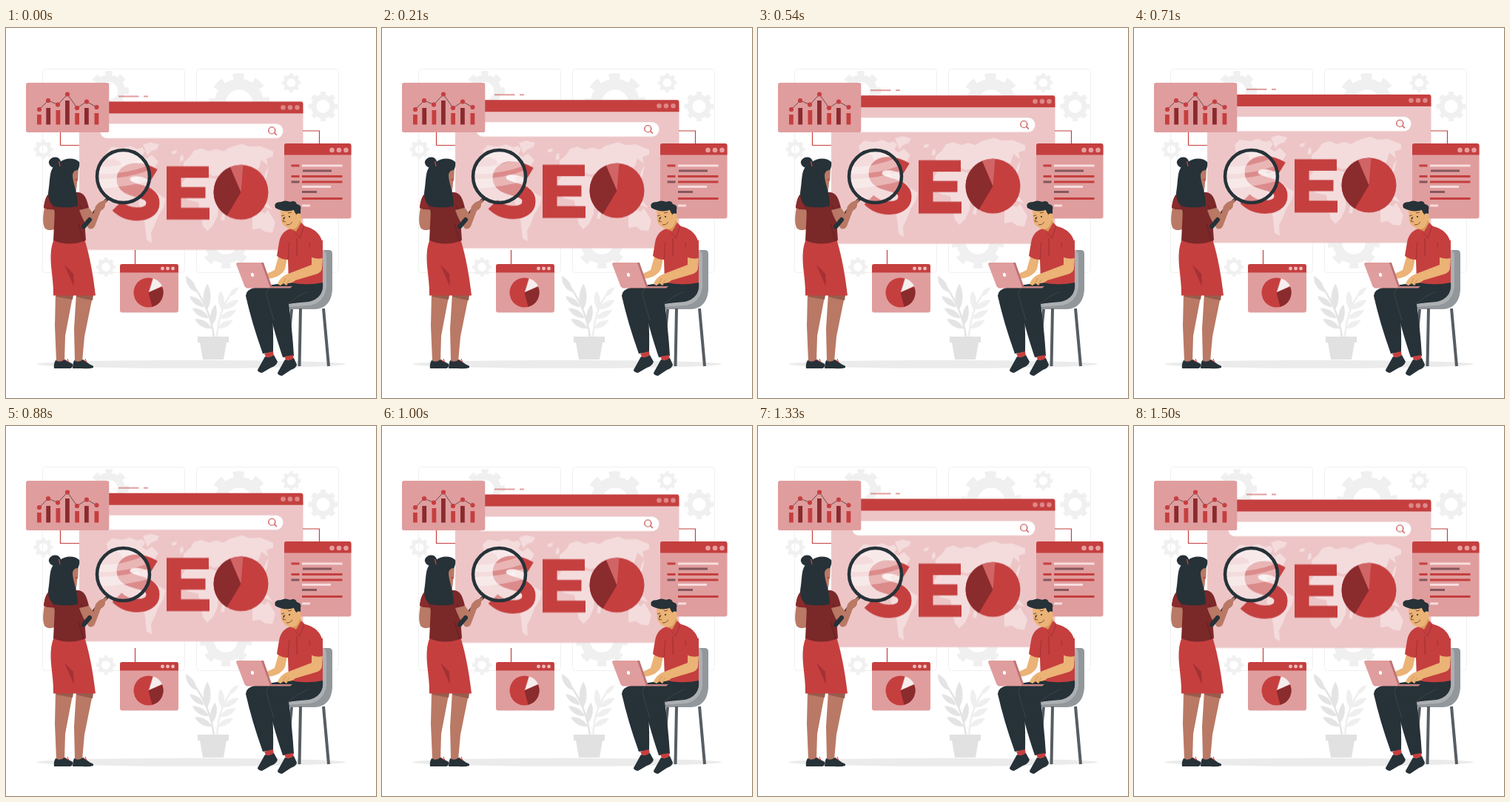
An HTML page that plays this animation: 500 by 500 pixels, repeating every 1540 ms.

```html
<!DOCTYPE html>
<html lang="en">
<head>
<meta charset="utf-8">
<title>SEO illustration</title>
<style>
  html, body { margin: 0; width: 100%; height: 100%; overflow: hidden; background: #fff; }
  svg { display: block; width: 100%; height: 100%; }
  .red { fill: #c53f3f; }
  .deep { fill: #8a2b2d; }
  .rose { fill: #e09d9e; }
  .ink { fill: #263238; }
  .wine { fill: #7b2829; }
  .tan { fill: #b97965; }
  .skin { fill: #ebb376; }
  .line { fill: none; stroke: #c53f3f; stroke-width: 1.2; }
  .pale { fill: none; stroke: #f0f0f0; }
  .float { animation: float 770ms cubic-bezier(.37, 0, .63, 1) -40ms infinite alternate; }
  @keyframes float {
    from { transform: translateY(.5px); }
    to { transform: translateY(-9.2px); }
  }
</style>
</head>
<body>
<svg viewBox="0 0 500 500" role="img" aria-label="SEO">
  <defs>
    <g id="gear" fill="none" stroke="#f0f0f0">
      <circle r="6.3" stroke-width="3.6"/>
      <circle r="8.9" stroke-width="2.2" pathLength="16" stroke-dasharray="1 1" stroke-dashoffset=".5"/>
    </g>
    <g id="dots">
      <circle r="3.3"/><circle cx="9.5" r="3.3"/><circle cx="19" r="3.3"/>
    </g>
    <path id="leaf" d="M0 0C-6 -8 -5 -19 0 -26C5 -19 6 -8 0 0Z"/>
    <clipPath id="glass"><circle cx="158.5" cy="200.5" r="35"/></clipPath>
  </defs>

  <!-- backdrop -->
  <rect class="pale" x="49.5" y="55.5" width="192" height="275" rx="4"/>
  <rect class="pale" x="257.5" y="55.5" width="192" height="275" rx="4"/>
  <use href="#gear" transform="translate(139 85) scale(2.7)"/>
  <use href="#gear" transform="translate(50.5 164) scale(1.3)"/>
  <use href="#gear" transform="translate(135 323) scale(1.3)"/>
  <use href="#gear" transform="translate(315 102) scale(4.1)"/>
  <use href="#gear" transform="translate(385.5 74) scale(1.3)"/>
  <use href="#gear" transform="translate(428.5 106) scale(2)"/>
  <use href="#gear" transform="translate(297 290) scale(3.5)"/>
  <ellipse cx="250" cy="454.3" rx="209" ry="5.5" fill="#ebebeb"/>

  <!-- plant -->
  <g fill="#efefef">
    <path d="M285 418Q287 382 305 358" fill="none" stroke="#efefef" stroke-width="2.5"/>
    <use href="#leaf" transform="translate(301 363) rotate(46) scale(.7)"/>
    <use href="#leaf" transform="translate(292 381) rotate(-5)"/>
    <use href="#leaf" transform="translate(293 380) rotate(60) scale(.95)"/>
    <use href="#leaf" transform="translate(289 393) rotate(62) scale(.95)"/>
    <use href="#leaf" transform="translate(286 406) rotate(62) scale(.9)"/>
  </g>
  <g fill="#e4e4e4">
    <path d="M281 418Q276 378 252 347" fill="none" stroke="#e4e4e4" stroke-width="2.5"/>
    <use href="#leaf" transform="translate(257 357) rotate(-33)"/>
    <use href="#leaf" transform="translate(268 377) rotate(-54) scale(.95)"/>
    <use href="#leaf" transform="translate(274 392) rotate(-59)"/>
    <use href="#leaf" transform="translate(278 406) rotate(-61)"/>
    <use href="#leaf" transform="translate(271 382) rotate(2) scale(1.2 1.4)"/>
    <use href="#leaf" transform="translate(278 402) rotate(10) scale(1 1.1)"/>
  </g>
  <path d="M259 417H301V425H298L294 448H266L262 425H259Z" fill="#e1e1e1"/>

  <!-- browser window -->
  <g class="float">
    <path class="line" d="M152 92H179.5M186 92H192"/>
    <path d="M99 110H401.500V299.500H99Z" fill="#edc5c6"/>
    <path class="red" d="M99 115V102Q99 99 102 99H398.500Q401.500 99 401.500 102V115Z"/>
    <use href="#dots" x="374.5" y="107" fill="#de8889"/>
    <rect x="127" y="129" width="247.5" height="19.5" rx="9.7" fill="#fff"/>
    <circle class="line" cx="359.3" cy="138" r="4.5"/>
    <path class="line" d="M362.5 141.2L366 144.2"/>

    <g fill="#f4dcdd">
      <path d="M136 167L143 160L157 162L168 159L177 163L184 161L188 166L184 172L190 176L197 171L206 180L201 188L194 190L188 199L179 204L181 211L188 215L184 217L173 211L166 201L160 193L154 180L145 176L138 178Z"/>
      <path d="M185 157L195 154L207 157L204 163L196 166L191 172L188 164Z"/>
      <path d="M187 217L199 217L207 225L216 230L213 242L206 253L201 266L196 276L197 290L190 286L188 267L185 249L179 237L182 223Z"/>
      <path d="M240 181L249 173L254 165L264 162L274 166L284 163L294 166L302 161L319 156L329 160L343 159L361 166L361 173L352 176L354 185L345 178L342 188L337 196L340 206L334 211L330 220L324 214L319 207L315 219L310 217L304 205L296 205L290 198L281 200L272 196L263 196L255 193L246 199L240 193Z"/>
      <path d="M244 200L263 199L283 203L291 216L299 219L293 230L287 238L286 253L280 266L272 274L266 267L262 248L260 235L246 232L237 222L238 209Z"/>
      <path d="M293 247L297 245L295 260L290 259Z"/>
      <path d="M333 255L343 247L350 250L354 245L364 262L360 276L350 275L343 270L333 272Z"/>
      <path d="M322 224L332 233L340 235L332 237L323 230ZM341 231L354 237L360 245L349 241ZM351 193L355 187L352 202L347 206Z"/>
      <path d="M235 174L239 170L240 178L235 181ZM224 166L231 164L230 169L224 170Z"/>
    </g>

    <path d="M200 198.500C192 193.500 183 191 176 191C164 191 158.500 197 158.500 204C158.500 214 168 216.500 178 219.500C190 222.500 198.500 226 198.500 236C198.500 246 189 251 177 251C167 251 157 247 150 240" fill="none" stroke="#c53f3f" stroke-width="18"/>
    <path class="red" d="M217 186.500H274V202H236.500V214.500H269.500V229.500H236.500V242.500H275V258.500H217Z"/>
    <circle class="red" cx="317.5" cy="221.5" r="37"/>
    <path class="deep" d="M317.500 221.500L298.500 253.200A37 37 0 0 1 303 187.500Z"/>
    <path d="M317.500 221.500L303 187.500A37 37 0 0 1 320.500 184.600Z" fill="#d16465"/>
  </g>

  <!-- connectors -->
  <path class="line" d="M73.500 141V158.500H99M401 139H423.500V156M174.500 300V319"/>

  <!-- bar chart card -->
  <rect class="rose" x="27" y="74" width="112.3" height="67" rx="2.5"/>
  <path class="red" d="M42 117h5.800v13.500h-5.800zM67.500 111h5.800v19.500h-5.800zM93.200 115h5.800v15.500h-5.800zM119.500 115h5.800v15.500h-5.800z"/>
  <path class="deep" d="M54.300 108h5.800v22.500h-5.800zM80 98h5.800v32.500h-5.800zM106 108h5.800v22.500h-5.800z"/>
  <path d="M45 110L57 98L70 103.500L83 89.500L96 108L109 99.500L122.500 107" fill="none" stroke="#4b3638" stroke-width=".8"/>
  <path d="M45 110h0M57 98h0M70 103.500h0M83 89.500h0M96 108h0M109 99.500h0M122.500 107h0" stroke="#c53f3f" stroke-width="6.2" stroke-linecap="round"/>

  <!-- pie card -->
  <rect class="rose" x="154" y="319" width="79" height="65.5" rx="3"/>
  <path class="red" d="M154 330.500V322Q154 319 157 319H230Q233 319 233 322V330.500Z"/>
  <use href="#dots" transform="translate(211.5 325) scale(.74)" fill="#eebcbc"/>
  <circle class="red" cx="192.5" cy="357.5" r="20"/>
  <path class="rose" d="M192.500 357.500L198.500 338A20 20 0 0 1 211 349.500Z"/>
  <path d="M193.500 356.500L199 338.500A20 20 0 0 1 211 348.500Z" fill="#f6eeee"/>
  <path class="deep" d="M192.500 357.500L211 349.500A20 20 0 0 1 197.500 376.800Z"/>

  <!-- list card -->
  <rect class="rose" x="376" y="156" width="90.5" height="101.5" rx="3"/>
  <path class="red" d="M376 171.500V159Q376 156 379 156H463.500Q466.500 156 466.500 159V171.500Z"/>
  <use href="#dots" x="440.5" y="165" fill="#e79fa0"/>
  <g fill="none" stroke-width="3.2">
    <path d="M385.500 186H396.500M385.500 200.500H396.500M400 200.500H454.500M400 208H454.500M400 230.500H454.500" stroke="#c53f3f"/>
    <path d="M401 193H440M385.500 208H396.500M400 221.500H420" stroke="#85565c"/>
    <path d="M400 186H454.500M400 214.500H439M400 240H411" stroke="#f8dcdd"/>
  </g>

  <!-- woman -->
  <path class="tan" d="M67 358H91L80 416L79 451H68L66 402Z"/>
  <path class="tan" d="M95 358H118L106 417L103 451H93L92 406Z"/>
  <path d="M69 361H91L90 367Q78 365 68 363ZM95 361H118L117 368Q105 366 95 363Z" fill="#965c4c"/>
  <path class="ink" d="M67 449Q73 453 79 448L90 454Q91 459 87 460H65Q64 454 67 449ZM92 449Q98 453 104 448L114 455Q119 456 118 459Q113 461 103 460H90Q90 454 92 449Z"/>
  <path d="M79 448l5 3m-1-4l2 5M104 448l4 3m-1-4l2 5" stroke="#c53f3f" stroke-width="1" fill="none"/>
  <path class="red" d="M65 285H106C114 311 118 336 121 361.500H64C65 334 55 309 65 285Z"/>
  <path d="M79 320L92 350L91 332Z" fill="#a63034"/>
  <path class="tan" d="M52 242L67 243L66 272Q56 275 52 270C49 262 50 254 52 242Z"/>
  <path class="wine" d="M60 222C54 226 52 234 51 243Q57 246 66 245L64 287Q85 296 108 287L105 248L112 243C109 230 106 223 98 222Z"/>
  <path d="M60 222C54 226 52 234 51 243Q57 246 65 245L62 228Z" fill="#8a2b2d"/>
  <path d="M105 288L98 265M67 250L63 240M106 248L100 240" stroke="#611e21" stroke-width=".8" fill="none"/>
  <path class="tan" d="M84 204L96 207Q96 222 91 228L82 226Z"/>
  <path class="tan" d="M86 190L98 188L97.500 199Q98 210 92 211L84 209Z"/>
  <path class="ink" d="M73 181C79 176 92 174 99 181Q100 187 97 192Q91 192 90 198C90 211 97 220 97 241Q80 244 65 241Q57 236 57 223C60 206 58 192 66 186Z"/>
  <path class="ink" d="M58 183Q57 178 63 175Q71 173 74 180Q75 188 67 189Q60 189 58 183Z"/>
  <path d="M71.500 180L73 187" stroke="#c53f3f" stroke-width="1.4"/>
  <circle cx="95" cy="205" r="1.3" class="red"/>

  <!-- magnifying glass -->
  <circle cx="158.5" cy="200.5" r="35" fill="#fff" opacity=".4"/>
  <g clip-path="url(#glass)" fill="#fff" opacity=".36">
    <path d="M121 188Q157 189 191 174L197 184Q160 199 121 197Z"/>
    <path d="M121 204Q163 205 199 190V205Q166 215 125 217Z"/>
  </g>
  <path d="M138 230L129 239" stroke="#263238" stroke-width="4"/>
  <path d="M130 238L120 250" stroke="#263238" stroke-width="6.5" stroke-linecap="round"/>
  <circle cx="158.500" cy="200.500" r="35.5" fill="none" stroke="#263238" stroke-width="4.5"/>
  <path class="tan" d="M99 246L112 243L118 251L121 241Q126 234 131 234L136 231Q137 234 134 237Q135 243 128 247L120 268Q117 273 112 271Q104 261 99 246Z"/>
  <path d="M113 259L105 268.500" stroke="#263238" stroke-width="6" stroke-linecap="round"/>

  <!-- chair -->
  <path d="M424 300H436Q441 300 441 305V354Q439 379 417 380H380V373L416 365Q427 360 427 345Z" fill="#92979b"/>
  <path d="M424 300H429Q433 302 433 308V350Q430 373 408 375L380 377V371L414 363Q427 358 427 344Z" fill="#acb0b3"/>
  <path d="M398 379L396.500 457M429 379L436 457M386 380L381 430" stroke="#565d63" stroke-width="4" fill="none"/>

  <!-- man -->
  <path class="ink" d="M378 344H428Q430 365 409 370L364 374L356 353Q362 389 361 438L347 440Q332 398 324 362Q325 353 336 351Z"/>
  <path class="ink" d="M428 344Q430 363 409 368L382 373Q387 409 389 443L374 445Q358 398 352 362Q352 349 370 347Z"/>
  <path d="M356 352Q350 355 353 365L362 395M408 356Q392 363 381 373" stroke="#3f4b51" fill="none" stroke-width=".8"/>
  <path class="red" d="M349 440L361 437L362 444L352 446ZM376 444L388 442L389 449L379 450Z"/>
  <path class="ink" d="M350 444Q356 447 362 442L367 451Q365 457 358 459L346 466Q340 465 340 462ZM377 448Q383 451 389 446L393 455Q392 460 385 462L373 470Q367 469 367 466Z"/>
  <path class="skin" d="M369 306L380 311L377 326Q372 335 360 338L350 339L351 333L363 327Z"/>
  <path class="red" d="M388 270C376 273 371 279 369 290L366 308Q372 313 381 313L382 343Q403 349 428 344V310L428 294C427 281 420 271 400 267Z"/>
  <path class="skin" d="M386 258L398 257L400 268Q396 276 389 274Z"/>
  <path d="M386 272L397 260L400 267L391 276Z" fill="#d99657"/>
  <path class="red" d="M387 272L391 280L403 267L399 263L392 275Z"/>
  <path d="M391 277L397 284L403 267M393 284V309M381 313L383 289M413 309L410 290" fill="none" stroke="#992d31" stroke-width=".8"/>
  <path class="skin" d="M371 246Q385 239 397 245L397 260Q395 272 386 272Q375 270 372 261Z"/>
  <path class="ink" d="M364 243Q361 235 372 235Q377 232 384 235Q391 232 393 238Q400 239 398 246Q399 252 395 254Q391 252 389 246Q376 250 364 243Z"/>
  <ellipse class="skin" cx="395.5" cy="254.5" rx="3.3" ry="4"/>
  <path d="M372 254l4-1M381 250l5-1M377 255l-3 6l4 1M379 266Q384 267 387 262" stroke="#6c402d" stroke-width=".9" fill="none"/>
  <circle class="ink" cx="375.5" cy="257" r="1.1"/>
  <circle class="ink" cx="383" cy="255" r="1.1"/>

  <!-- laptop and near arm -->
  <path d="M324 349H387L384 351.500H325Z" fill="#c98586"/>
  <path d="M312 317H348L359 348.500L357 351H327Q324 351 323 348Z" fill="#bd7275"/>
  <path class="rose" d="M312 317H345L357 351H326Q323 351 322 348L311 319Z"/>
  <ellipse cx="333" cy="333.5" rx="2" ry="2.7" transform="rotate(-20 333 333.5)" fill="#fff"/>
  <path class="skin" d="M413 309H428L427 325Q426 331 418 333L391 341Q387 345 381 345L379 348L375 345L371 348L367 346Q370 337 379 333L413 320Z"/>
  <path d="M374 346L378 338M379 346L383 340" stroke="#c98b4f" stroke-width=".7"/>
  <path class="red" d="M411 285L428 287V311Q419 313 411 309Z"/>
</svg>
</body>
</html>
```
